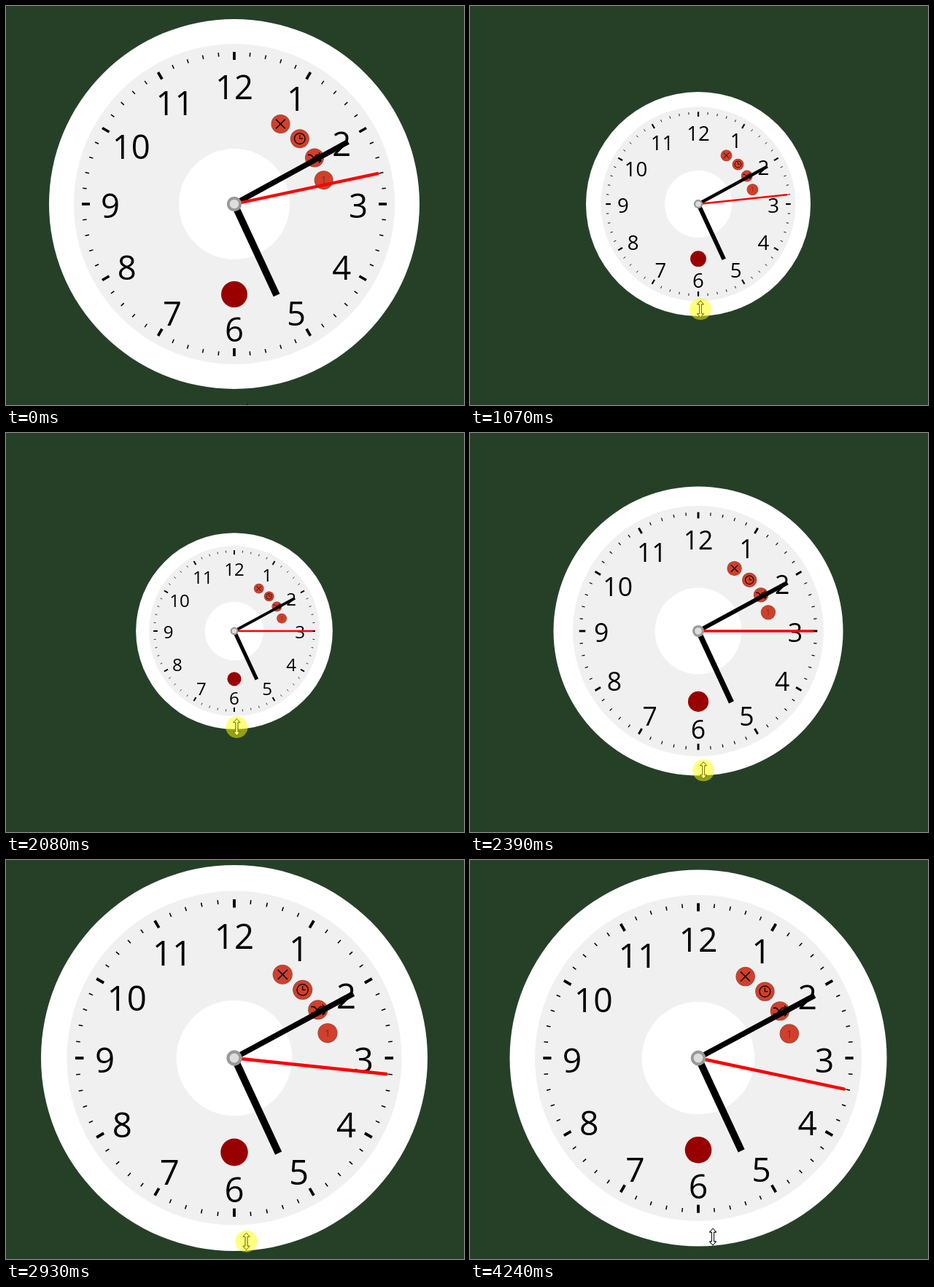
An HTML page with a canvas that plays this animation: 628x548 px, repeating every 4.31 s.

```html
<!DOCTYPE html>
<html lang="en">
<head>
<meta charset="utf-8">
<title>Resizable clock</title>
<style>
html, body { margin: 0; width: 100%; height: 100%; overflow: hidden; background: #264028; }
canvas { display: block; }
</style>
</head>
<body>
<canvas width="628" height="548"></canvas>
<script>
const LOOP = 4310, STEP = 76.7, CX = 313, CY = 272, BASE = 254;
const ctx = document.querySelector('canvas').getContext('2d');

// Dial radius at the turning points of the drag: [time, radius]
const SIZES = [
  [380, 254], [770, 217], [920, 177], [1070, 154], [1610, 109],
  [1860, 109], [2390, 198.5], [2930, 265], [3160, 265], [3620, 258.5]
];

// Smooth curve through SIZES, at rest at both ends of each drag.
function radiusAt(t) {
  const last = SIZES.length - 1;
  const rate = i => (SIZES[i + 1][1] - SIZES[i][1]) / (SIZES[i + 1][0] - SIZES[i][0]);
  const slope = i => {
    if (i === 0 || i === last) return 0;
    const a = rate(i - 1), b = rate(i);
    return a * b > 0 ? 2 * a * b / (a + b) : 0;
  };
  if (t <= SIZES[0][0]) return SIZES[0][1];
  if (t >= SIZES[last][0]) return SIZES[last][1];
  const i = SIZES.findIndex(s => s[0] > t) - 1;
  const [t0, r0] = SIZES[i], [t1, r1] = SIZES[i + 1];
  const d = t1 - t0, u = (t - t0) / d, v = 1 - u;
  return v * v * ((1 + 2 * u) * r0 + u * d * slope(i))
    + u * u * ((1 + 2 * v) * r1 - v * d * slope(i + 1));
}

function smooth(from, to, t) {
  const u = Math.min(1, Math.max(0, (t - from) / (to - from)));
  return u * u * (3 - 2 * u);
}

// The pointer swings in from below, then leads the rim by a moment.
function pointerAt(t) {
  const p = smooth(0, 310, t);
  return [
    316 + 15 * (1 - p) - 13 * Math.sin(Math.PI * p) + 17 * smooth(1950, 3330, t),
    CY + .95 * radiusAt(t + 20) + 45 * (1 - p)
  ];
}

// The picture advances in even steps, restarting after the pause.
function snap(t) {
  const start = t < 1860 ? 0 : 1853;
  const k = Math.floor((t - start + 8) / STEP);
  return Math.round((start + k * STEP) / 10) * 10;
}

const polar = (deg, r) => {
  const a = deg * Math.PI / 180;
  return [r * Math.sin(a), -r * Math.cos(a)];
};

function disc(x, y, r, fill) {
  ctx.beginPath();
  ctx.arc(x, y, r, 0, 7);
  ctx.fillStyle = fill;
  ctx.fill();
}

function path(points, width, color = '#000') {
  ctx.beginPath();
  points.forEach(p => ctx.lineTo(...p));
  ctx.lineWidth = width;
  ctx.strokeStyle = color;
  ctx.stroke();
}

function ray(deg, from, to, width, color) {
  path([polar(deg, from), polar(deg, to)], width, color);
}

function label(text, x, y, size, color = '#000') {
  ctx.font = `${size}px "Open Sans", "Noto Sans", sans-serif`;
  ctx.textAlign = 'center';
  ctx.fillStyle = color;
  ctx.fillText(text, x, y + size * .357);
}

const ICONS = [
  function cross() {
    for (const s of [-6.3, 6.3]) path([[-6.3, -s], [6.3, s]], 1.5);
  },
  function clock() {
    ctx.beginPath();
    ctx.arc(0, 0, 7.3, 0, 7);
    ctx.lineWidth = 1.3;
    ctx.stroke();
    path([[0, -5], [0, 0], [4, 0]], 1.3);
  },
  function shuffle() {
    for (const s of [-4, 4]) {
      path([[-9, s], [-5, s], [3, -s], [8, -s]], 1.5);
      path([[6, -s - 3], [9, -s], [6, -s + 3]], 1.5);
    }
  },
  function number() {
    label('1', 0, 0, 14, '#8c2a1c');
  }
];

// Drawn for a dial of radius BASE.
function dial(seconds) {
  disc(0, 0, BASE, '#fff');
  disc(0, 0, 220, '#f0f0f0');
  disc(0, 0, 76, '#fff');
  for (let m = 0; m < 60; m++) {
    const hour = m % 5 === 0;
    ray(m * 6, hour ? 198 : 203.5, 209, hour ? 3.7 : 1.5);
  }
  for (let h = 1; h <= 12; h++) {
    const [x, y] = polar(h * 30, h > 9 ? 163 : 170);
    label(h, x, y + 3.2, 45.5);
  }
  disc(0, 124, 18, '#990000');
  ICONS.forEach((icon, i) => {
    ctx.save();
    ctx.translate(...polar(30 + i * 15, 127));
    disc(0, 0, 13, '#7c5048');
    disc(0, 0, 12.4, '#d0402a');
    ctx.strokeStyle = '#000';
    icon();
    ctx.restore();
  });
  ray(155.1, 0, 138, 9.6);
  ray(60 + seconds / 10, 0, 178, 7.3);
  ctx.lineCap = 'round';
  ray(seconds * 6, 0, 201, 4.3, '#f00');
  ctx.lineCap = 'butt';
  disc(0, 0, 10.2, '#999');
  disc(0, 0, 6.2, '#ddd');
}

function pointer(x, y, pressed) {
  const half = [[0, -11.5], [4.5, -6.5], [1.5, -6.5], [1.5, 6.5], [4.5, 6.5], [0, 11.5]];
  const mirror = half.map(([px, py]) => [-px, py]).reverse();
  ctx.save();
  ctx.translate(x, y);
  ctx.fillStyle = '#fff';
  path([...half, ...mirror], 1);
  ctx.fill();
  ctx.stroke();
  if (pressed) disc(0, 0, 15, 'rgba(255,255,0,.5)');
  ctx.restore();
}

function draw(now) {
  const t = snap(now % LOOP);
  const scale = radiusAt(t) / BASE;
  ctx.fillStyle = '#264028';
  ctx.fillRect(0, 0, 628, 548);
  ctx.save();
  ctx.translate(CX, CY);
  ctx.scale(scale, scale);
  dial(13 + Math.floor((t + 460) / 1000));
  ctx.restore();
  pointer(...pointerAt(t), t >= 460 && t < 3930);
  requestAnimationFrame(draw);
}
requestAnimationFrame(draw);
</script>
</body>
</html>
```
